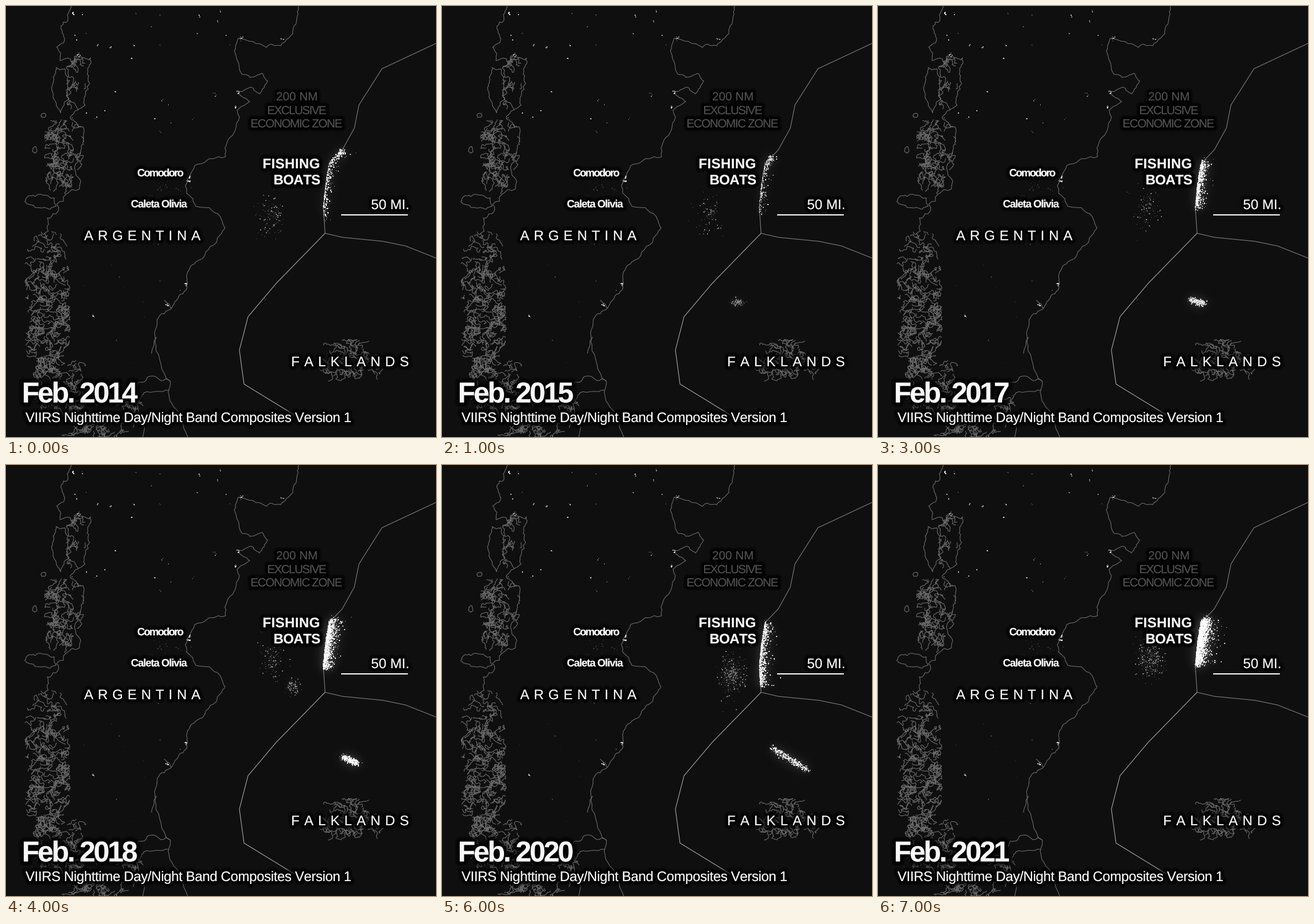
Write a matplotlib script that moves like this. It is 748 px wide and 749 px high and loops after 8000 ms.

```python
import numpy as np
import matplotlib.pyplot as plt
from matplotlib.animation import FuncAnimation
from matplotlib.collections import LineCollection
from matplotlib.patches import PathPatch
from matplotlib.path import Path
from matplotlib.textpath import TextPath

W, H, DPI = 748, 749, 100
PX = 72 / DPI
YEARS = range(2014, 2022)
rng = np.random.default_rng(7)

fig = plt.figure(figsize=(W / DPI, H / DPI), dpi=DPI)
ax = fig.add_axes([0, 0, 1, 1])
ax.set_axis_off()


def gray(v):
    return (v / 255,) * 3


# ---- coastlines and borders ----------------------------------------------

def rough(points, k=0.1, depth=3):
    """Subdivide a polyline, pushing every midpoint sideways."""
    p = np.array(points, float)
    for _ in range(depth):
        d = np.diff(p, axis=0)
        out = np.empty((2 * len(p) - 1, 2))
        out[::2] = p
        side = d[:, ::-1] * [1, -1]
        out[1::2] = (p[:-1] + p[1:]) / 2 + rng.normal(0, k, (len(d), 1)) * side
        p = out
    return p


def fjords(cx, cy, rx, ry, n):
    """n wandering shorelines kept inside a rounded box."""
    lines = []
    while len(lines) < n:
        p = np.array([cx, cy]) + rng.uniform(-1, 1, 2) * [rx, ry]
        a = rng.uniform(0, 2 * np.pi)
        pts = []
        for _ in range(rng.integers(9, 32)):
            if np.sum(((p - [cx, cy]) / [rx, ry]) ** 4) > 1:
                break
            pts.append(p)
            a += rng.normal(0, 0.9)
            p = p + 2.4 * np.array([np.cos(a), np.sin(a)])
        if len(pts) > 4:
            lines.append(np.array(pts))
    return lines


def islet(x, y, rx, ry):
    a = np.linspace(0, 2 * np.pi, 13)
    q = rng.uniform(0.75, 1.1, 13)
    q[-1] = q[0]
    return rough(np.c_[x + rx * q * np.cos(a), y + ry * q * np.sin(a)])


gulfs = [(509, 0), (508, 14), (499, 48), (478, 69), (453, 72), (404, 56),
         (400, 85), (410, 118), (424, 124), (445, 117), (455, 130), (441, 153),
         (426, 141), (405, 149), (424, 166), (402, 181), (394, 225), (382, 262),
         (350, 268), (318, 299)]
patagonia = [(318, 299), (314, 325), (330, 348), (372, 365), (381, 385),
             (366, 411), (330, 445), (314, 470), (308, 500), (288, 525),
             (263, 545), (261, 590), (286, 652), (288, 690), (316, 749)]
inlets = [[(288, 525), (275, 511)], [(262, 575), (253, 604)],
          [(286, 652), (255, 643), (226, 664)],
          [(283, 668), (240, 672), (228, 692), (238, 749)]]
pacific = [(114, 0), (100, 50), (94, 95), (147, 90), (141, 140), (112, 192),
           (135, 230), (126, 270), (88, 345), (66, 396)]

coast = [rough(c) for c in [gulfs, patagonia, *inlets]]
coast += [rough(pacific, 0.18, 4), islet(95, 142, 16, 40), islet(65, 190, 5, 4),
          islet(50, 250, 4, 6), islet(62, 340, 28, 14)]
for region in [(121, 130, 18, 50, 12), (92, 262, 26, 66, 52), (122, 250, 14, 50, 7),
               (72, 515, 40, 124, 130), (95, 655, 48, 50, 48),
               (160, 712, 80, 40, 36), (600, 617, 56, 38, 42)]:
    coast += fjords(*region)

edge = np.array([(748, 65), (654, 109), (614, 172), (606, 212), (585, 250),
                 (562, 274), (556, 310), (552, 350), (555, 395)])
south = [(555, 395), (470, 482), (421, 540), (406, 598), (414, 657), (512, 717)]
east = [(555, 395), (585, 402), (656, 409), (695, 417), (748, 438)]


def strokes(lines, shade):
    ax.add_collection(LineCollection(lines, colors=[gray(shade)],
                                     linewidths=1.1 * PX, zorder=1))


strokes(coast, 108)
strokes([edge, east], 128)
strokes([south], 170)
ax.plot([584, 698], [363, 363], color="white", lw=2 * PX, zorder=5)

# ---- lights --------------------------------------------------------------

def dots(img, gen, x, y, level):
    """Add bright specks of one to four pixels."""
    x = np.rint(x).astype(int).clip(0, W - 2)
    y = np.rint(y).astype(int).clip(0, H - 2)
    v = level * gen.uniform(0.45, 1, len(x))
    wide = gen.random(len(x)) < 0.35
    for dx, dy in ((0, 0), (1, 0), (0, 1), (1, 1)):
        np.maximum.at(img, (y + dy, x + dx), v * (wide if dx or dy else 1))


def cluster(img, gen, x, y, sx, sy, n, level):
    dots(img, gen, gen.normal(x, sx, n), gen.normal(y, sy, n), level)


land = np.zeros((H, W))
for tx, ty in [(115, 12), (126, 87), (183, 71), (404, 148), (399, 174), (478, 57),
               (408, 55), (319, 297), (317, 303), (150, 538), (311, 483), (280, 519)]:
    cluster(land, rng, tx, ty, 1.5, 1.5, 7, 1)
for tx, ty in zip(rng.uniform(110, 390, 30), 230 * rng.random(30) ** 1.5):
    cluster(land, rng, tx, ty, 1, 1, 2, 0.8)
cluster(land, rng, 275, 315, 18, 11, 34, 0.22)
cluster(land, rng, 230, 480, 50, 40, 12, 0.3)

# Yearly state of each fishing ground; missing years are interpolated.
surveys = [2014, 2016, 2018, 2019, 2020, 2021]
grounds = {
    # along the zone's edge: top, bottom, skew towards the top, boats
    "edge": [(254, 370, 2.2, 420), (275, 350, 1.4, 130), (268, 352, 1, 1500),
             (285, 361, 0.3, 560), (274, 382, 1, 850), (268, 346, 1.1, 2500)],
    # on the shelf: centre, boats
    "shelf": [(460, 366, 110), (468, 366, 70), (461, 338, 110),
              (480, 308, 45), (503, 365, 230), (475, 340, 240)],
    # north of the islands: centre, half length, drop, boats
    "islands": [(513, 514, 9, 0, 0), (513, 514, 9, 0, 190), (598, 512, 13, 5, 400),
                (617, 520, 30, 16, 400), (605, 511, 31, 19, 420), (605, 511, 31, 19, 0)],
}
knots = {2016: (655, 108, 150), 2018: (499, 384, 70)}

fy, fx = np.meshgrid(np.fft.fftfreq(H, 1 / H), np.fft.fftfreq(W, 1 / W), indexing="ij")
kernel = np.exp(-np.hypot(fx, fy) / 6)
soften = np.fft.rfft2(kernel / kernel.sum())


def state(ground, year):
    return [np.interp(year, surveys, col) for col in zip(*grounds[ground])]


def night(year):
    gen = np.random.default_rng(year)
    boats = np.zeros((H, W))

    top, bottom, skew, n = state("edge", year)
    y = top + (bottom - top) * gen.random(int(n)) ** skew
    x = np.interp(y, edge[:, 1], edge[:, 0]) + gen.exponential(3 + n / 800, int(n)) - 1
    dots(boats, gen, x, y + gen.normal(0, 3, int(n)), min(1, 0.55 + n / 800))

    x, y, n = state("shelf", year)
    cluster(boats, gen, x, y, 11, 18, int(n), 0.5)

    x, y, half, drop, n = state("islands", year)
    t = gen.uniform(-1, 1, int(n))
    dots(boats, gen, x + half * t + gen.normal(0, 3, int(n)),
         y + drop * t + gen.normal(0, 2.5, int(n)), min(1, 0.4 + n / 600))

    if year in knots:
        x, y, n = knots[year]
        cluster(boats, gen, x, y, 6, 7, n, 0.6)

    glow = np.fft.irfft2(np.fft.rfft2(boats) * soften, s=(H, W))
    light = np.maximum(land, boats) + 0.45 * glow
    rgba = np.full((H, W, 4), 255, np.uint8)
    rgba[..., 3] = (255 * light.clip(0, 1)).astype(np.uint8)
    return rgba


nights = [night(y) for y in YEARS]
sky = ax.imshow(nights[0], extent=(0, W, H, 0), interpolation="nearest", zorder=2)

# ---- lettering -----------------------------------------------------------

def glyph(s, size, font):
    return TextPath((0, 0), s, size=size, prop=font)


def lettering(s, x, y, size, track=0, bold=False):
    """Text outline with its ink starting at x and its baseline at y."""
    font = {"family": "Liberation Sans", "weight": "bold" if bold else "normal"}
    bar = glyph("|", size, font).get_extents().x1
    pen, parts = 0, []
    for c in s:
        if c != " ":
            p = glyph(c, size, font)
            parts.append(Path(p.vertices + [pen, 0], p.codes))
        pen += glyph(c + "|", size, font).get_extents().x1 - bar + track
    left = parts[0].get_extents().x0
    whole = Path.make_compound_path(*parts)
    return Path((whole.vertices - [left, 0]) * [1, -1] + [x, y], whole.codes)


def label(path, color, halo=1.0):
    """Outline drawn over a soft black halo; returns all its layers."""
    layers = [PathPatch(path, fc="none", ec="black", lw=w * halo * PX, alpha=a,
                        joinstyle="round", zorder=3)
              for w, a in ((15, 0.25), (11, 0.4), (7, 0.6), (4, 0.8))]
    layers.append(PathPatch(path, fc=color, ec=color, lw=0.25 * PX, zorder=5))
    for p in layers:
        ax.add_patch(p)
    return layers


white, dim = gray(248), gray(80)
for row, color in (
        (("200 NM", 471, 164, 20.5, 0.1), dim),
        (("EXCLUSIVE", 456, 188, 20.5, -1.5), dim),
        (("ECONOMIC ZONE", 427, 211, 20.5, -1.3), dim),
        (("FISHING", 448, 282, 24, 0.4, True), white),
        (("BOATS", 467, 310, 24, -0.6, True), white),
        (("Comodoro", 229, 296, 18.5, -1.8, True), white),
        (("Caleta Olivia", 218, 350, 18.5, -1.1, True), white),
        (("50 MI.", 636, 353, 24, 0), white),
        (("ARGENTINA", 136, 407, 24, 7.8), white),
        (("FALKLANDS", 498, 626, 24, 8.1), white),
        (("VIIRS Nighttime Day/Night Band Composites Version 1",
          34, 723, 24, -0.4), white)):
    label(lettering(*row), color)

titles = [lettering(f"Feb. {y}", 31, 689, 50, -3.3, True) for y in YEARS]
heading = label(titles[0], white, 1.2)

ax.set_xlim(0, W)
ax.set_ylim(H, 0)
ax.set_aspect("auto")
fig.set_facecolor(gray(15))


def update(i):
    sky.set_data(nights[i])
    for p in heading:
        p.set_path(titles[i])
    return [sky, *heading]


update(0)
anim = FuncAnimation(fig, update, frames=len(YEARS), interval=1000,
                     repeat=True, repeat_delay=0, blit=False)
plt.show()
```
